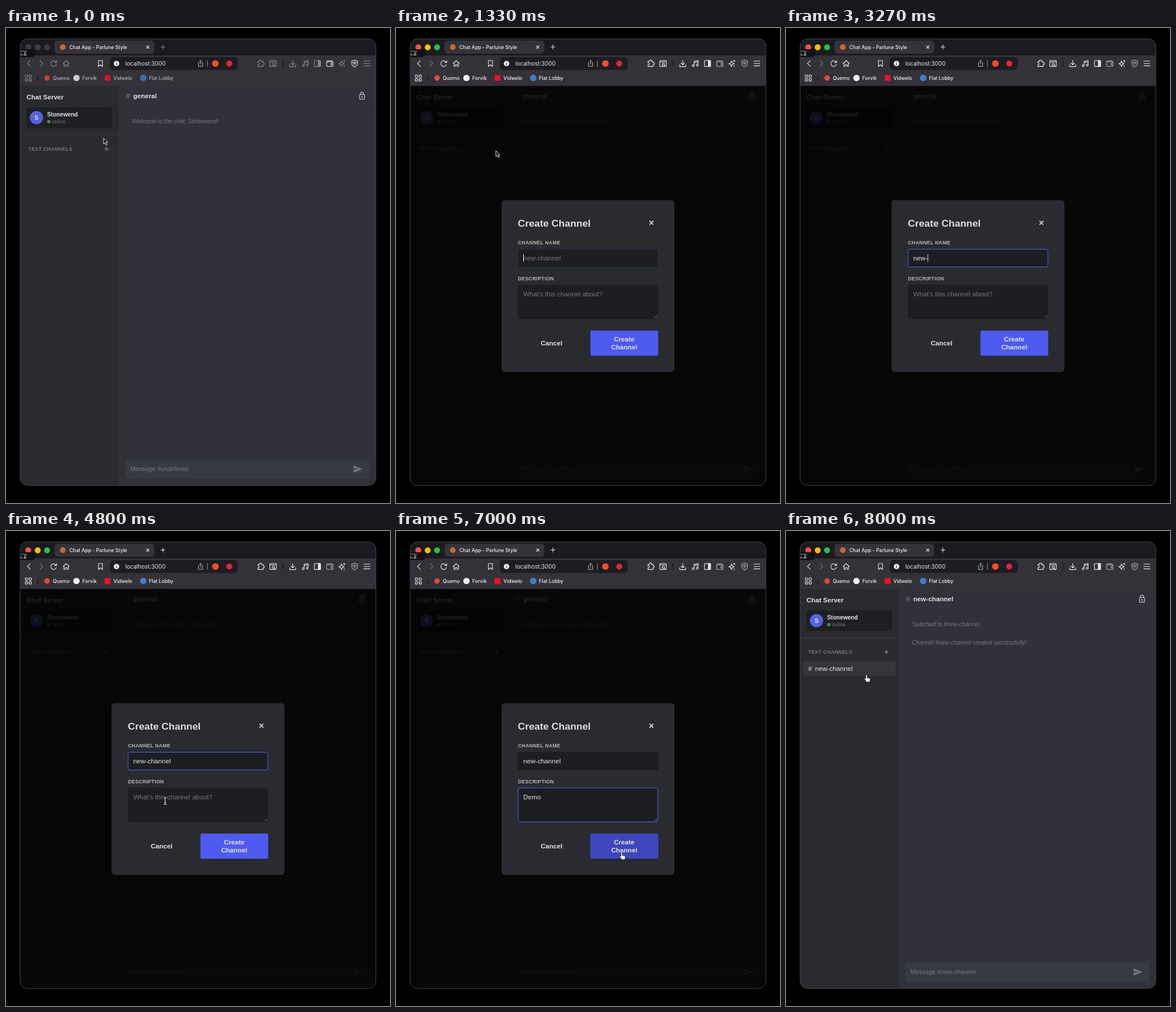
Recreate the animation shown at these times as an HTML page. Size 673 px wide and 832 px high, loop 8070 ms.

```html
<!DOCTYPE html>
<html lang="en">
<head>
<meta charset="utf-8">
<title>Chat App</title>
<style>
  html, body { margin: 0; width: 100%; height: 100%; overflow: hidden; background: #000; }
  svg { display: block; width: 673px; height: 832px; }
  text { font-family: "Liberation Sans", Arial, sans-serif; font-size: 11.6px; fill: #e2e3e6; white-space: pre; }
  .ui text { font: 500 8.6px Inter, sans-serif; fill: #f0f0f2; }
  .ui .url { font-size: 10px; font-weight: 400; fill: #e8e8ea; }
  .b { font-weight: bold; }
  .mid { text-anchor: middle; }
  .note { font-size: 10.15px; font-style: italic; fill: #77787e; }
  .label { font-size: 8.7px; font-weight: bold; letter-spacing: .35px; fill: #b6b7bc; }
  .ghost, .hint { fill: #75767c; }
  .line { fill: none; stroke: #e8e8ea; stroke-width: 1.1; stroke-linecap: round; stroke-linejoin: round; }
  .soft { stroke: #b5b4b9; }
  .faint { stroke: #77767c; }
  .idle .line { stroke: #89888e; }
  .idle .soft, .idle .mark { stroke: #f0f0f2; }
  .idle .faint { stroke: #89888e; }
  .idle .marks text { fill: #b3b2b7; }
  .idle .marks .logo { opacity: .8; }
  .idle .lights circle { fill: #3c3b41; }
  .field { fill: #1d1e22; }
  .ring { fill: none; stroke: #5560dc; }
</style>
</head>
<body>
<svg id="stage" viewBox="0 0 673 832">
  <defs>
    <clipPath id="frame"><rect x="25" y="19" width="623" height="782" rx="13"/></clipPath>
    <linearGradient id="face" x2="1" y2="1">
      <stop stop-color="#5b68ea"/><stop offset="1" stop-color="#4f5bd2"/>
    </linearGradient>
  </defs>

  <g clip-path="url(#frame)">
    <rect x="25" y="19" width="623" height="782" fill="#313239"/>

    <!-- chat page -->
    <rect x="25" y="101" width="173" height="700" fill="#2a2b2f"/>
    <path d="M198 136.5H648" stroke="#2d2e34"/>
    <path d="M25 187H198" stroke="#3a3b40"/>
    <text class="b" x="36" y="124.7">Chat Server</text>
    <rect x="36" y="139" width="150" height="36" rx="3.5" fill="#1e1f22"/>
    <circle cx="53.5" cy="157" r="11.6" fill="url(#face)"/>
    <text class="b mid" x="53.5" y="160.8" style="font-size:10.5px">S</text>
    <text class="b" x="72" y="154.8" style="font-size:10.15px">Stonewend</text>
    <circle cx="75" cy="164" r="3" fill="#37945a"/>
    <text class="hint" x="81" y="167" style="font-size:8.7px">online</text>
    <text class="label hint" x="39" y="215.1">TEXT CHANNELS</text>
    <path id="plus" d="M172.3 212H179.7M176 208.3V215.7" stroke-width="1.4"/>
    <g id="item">
      <rect x="30" y="228" width="162" height="25.5" rx="3" fill="#35363b"/>
      <text x="39" y="244.6">#</text>
      <text x="51" y="244.6">new-channel</text>
    </g>
    <text class="hint" x="209.5" y="124" style="font-size:14.5px">#</text>
    <text class="b" id="room" x="223" y="123.2"></text>
    <g fill="none" stroke="#bdbec2" stroke-width="1.3">
      <rect x="619.7" y="116.7" width="8.6" height="8" rx="1"/>
      <path d="M621.3 116.5V115a2.7 2.7 0 0 1 5.4 0V116.5"/>
      <circle cx="624" cy="120.7" r=".6"/>
    </g>
    <text class="note" id="note1" x="221" y="166.7"></text>
    <text class="note" id="note2" x="221" y="199.2">Channel #new-channel created successfully!</text>
    <rect x="209.5" y="755.5" width="427.5" height="34.5" rx="6" fill="#383a41"/>
    <text class="hint" id="prompt" x="218" y="776.4" style="font-size:10.85px"></text>
    <path d="M609 766.3L624.5 772.6L609 779V774L619 772.6L609 771.2Z" fill="#77787e"/>

    <!-- dialog -->
    <g id="modal">
      <rect x="25" y="101" width="623" height="700" fill="#000" opacity=".86"/>
      <rect x="185" y="301.5" width="303" height="301" rx="6" fill="#2a2b30"/>
      <text class="b" x="213.6" y="348" style="font-size:17.4px;fill:#dcdde0">Create Channel</text>
      <path d="M444.3 337.8L451 344.6M451 337.8L444.3 344.6" stroke="#c2c3c7" stroke-width="2"/>
      <text class="label" x="213.7" y="379">CHANNEL NAME</text>
      <rect class="field" x="213.5" y="387" width="246" height="32" rx="3"/>
      <rect class="ring" id="ring1" x="214" y="387.5" width="245" height="31" rx="3"/>
      <text class="ghost" id="ghost1" x="223" y="407">new-channel</text>
      <text id="text1" x="223" y="407"></text>
      <text class="label" x="213.7" y="441.7">DESCRIPTION</text>
      <rect class="field" x="213.5" y="449.5" width="246" height="60.5" rx="3"/>
      <rect class="ring" id="ring2" x="214" y="450" width="245" height="59.5" rx="3"/>
      <text class="ghost" id="ghost2" x="223" y="470">What's this channel about?</text>
      <text id="text2" x="223" y="470"></text>
      <path d="M453 508L458 503M456 508L458 506" stroke="#8a8b90" stroke-width=".8"/>
      <rect id="caret" width="1" height="13" fill="#eee"/>
      <text class="b mid" x="272.7" y="555.7">Cancel</text>
      <rect x="340.8" y="530" width="118.7" height="44" rx="2.5" fill="#4f5af0"/>
      <rect id="hover" x="340.8" y="530" width="118.7" height="44" rx="2.5" fill="#3d46bc"/>
      <text class="b mid" x="400" y="549.2">Create</text>
      <text class="b mid" x="400" y="562.7">Channel</text>
    </g>

    <!-- browser -->
    <g class="ui" id="ui">
      <rect x="25" y="19" width="623" height="29" fill="#1b1a21"/>
      <rect x="25" y="48" width="623" height="53.5" fill="#343139"/>
      <g class="lights">
        <circle cx="39" cy="33.7" r="5.2" fill="#fb5049"/>
        <circle cx="55.6" cy="33.7" r="5.2" fill="#fdbc09"/>
        <circle cx="72" cy="33.7" r="5.2" fill="#2bbd46"/>
      </g>
      <rect x="85" y="22" width="175" height="23" rx="6" fill="#35323a"/>
      <circle cx="99.5" cy="33.5" r="5" fill="#c9682b"/>
      <text x="111" y="36.6">Chat App - Parlune Style</text>
      <path d="M246 31L251 36M251 31L246 36" stroke="#e0e0e2" stroke-width="1.1"/>
      <path class="line" d="M271.3 33.3H278.7M275 29.6V37"/>

      <path class="line" d="M42.7 57.2L37.6 62.2L42.7 67.2"/>
      <path class="line faint" d="M59.5 57.2L64.5 62.2L59.5 67.2"/>
      <path class="line" d="M88 60A5 5 0 1 0 88.3 64M88.7 57V60.4H85.3"/>
      <path class="line" d="M100.3 62L105.5 57L110.7 62M101.6 61V67.3H104V64H107V67.3H109.4V61"/>
      <path class="line mark" d="M162 57H169V67.5L165.5 64.5L162 67.5Z"/>
      <rect x="182" y="51" width="224" height="22.5" rx="6" fill="#1e1c22"/>
      <circle cx="193.7" cy="62.2" r="4.8" fill="#e8e8ea"/>
      <path d="M193.7 61.6V65M193.7 59.3V60.3" stroke="#1e1c22" stroke-width="1.1"/>
      <text class="url" x="209" y="65.8">localhost:3000</text>
      <path d="M338.8 60.6H337.3V67.2H344.7V60.6H343.2M341 64V56.6M338.9 58.6L341 56.5L343.1 58.6" fill="none" stroke="#bcbbc0"/>
      <path d="M353 56.5V68" stroke="#97969c"/>
      <circle cx="367" cy="62.2" r="5.8" fill="#ee5029"/>
      <circle cx="391.3" cy="62.2" r="5.3" fill="#d8293f"/>

      <path class="line" d="M441.6 58.6H444.3Q443.6 56 446 56Q448.4 56 447.7 58.6H450.6V61Q452.9 60.4 452.9 62.6Q452.9 64.8 450.6 64.2V67.4H441.6V64.4Q444 64.6 444 62.7Q444 60.8 441.6 61Z"/>
      <g class="line">
        <rect x="462.3" y="57" width="11.4" height="10.4" rx="1"/>
        <path d="M462.5 59.3H473.5M470 65L471.5 66.3"/>
        <circle cx="468.4" cy="63.2" r="2"/>
      </g>
      <path d="M485.5 57V68" stroke="#17161b" stroke-width="1.3"/>
      <path class="line" d="M502.5 56.7V64.3M499.5 61.5L502.5 64.5L505.5 61.5M497.2 64.3V67.6H507.8V64.3"/>
      <g class="line">
        <path d="M522.5 66V58.3L529.5 56.8V64.8M522.5 60.6L529.5 59.1"/>
        <circle cx="520.8" cy="66" r="1.7"/><circle cx="527.8" cy="64.9" r="1.7"/>
      </g>
      <g class="line">
        <rect x="540.5" y="57" width="11" height="10.4" rx="1"/>
        <path d="M548 57.5V67M549.6 57.5V67" stroke-width="2.4"/>
      </g>
      <path class="line soft" d="M571.5 59.3V57.5H563.5Q562 57.5 562 59.3V66Q562 67.3 563.5 67.3H573V59.3H563.5M573 61.8H569.5V64.8H573"/>
      <path class="line" d="M588 57.5Q588.6 61.8 592.8 62.6Q588.6 63.4 588 67.8Q587.4 63.4 583.4 62.6Q587.4 61.8 588 57.5ZM592.8 56.3V59.3M591.3 57.8H594.3M592.8 65.8V68"/>
      <path class="line soft" d="M611 56.3L616 58V62.3Q615.6 66.3 611 68.3Q606.4 66.3 606 62.3V58ZM608 61Q611 58.7 614 61M609.4 63Q611 61.8 612.6 63M611 65V65.2"/>
      <path class="line" d="M627.2 58H637.8M627.2 62.2H637.8M627.2 66.4H637.8"/>

      <g class="line">
        <rect x="33.8" y="82.3" width="4" height="4" rx=".7"/><rect x="40.4" y="82.3" width="4" height="4" rx=".7"/>
        <rect x="33.8" y="88.9" width="4" height="4" rx=".7"/><rect x="40.4" y="88.9" width="4" height="4" rx=".7"/>
      </g>
      <path d="M55.8 82.5V93" stroke="#17161b" stroke-width="1.3"/>
      <g class="marks">
        <circle class="logo" cx="72" cy="87.5" r="4.8" fill="#e2483d"/>
        <text x="82" y="90.5">Quemo</text>
        <circle class="logo" cx="123.5" cy="87.5" r="5.6" fill="#f0f0f2"/>
        <text x="133.7" y="90.5">Forvik</text>
        <rect class="logo" x="173" y="82.5" width="10" height="10" fill="#f50f2c"/>
        <text x="188.3" y="90.5">Vidwelo</text>
        <circle class="logo" cx="240.5" cy="87.5" r="5.7" fill="#3f7fca"/>
        <text x="250.5" y="90.5">Flat Lobby</text>
      </g>

      <path d="M24 37.3H45a6.8 6.8 0 0 1 0 13.6H24Z" fill="#111015"/>
      <path d="M24 40.5H35.5V43M24 47.5H29.5M25 45.5H29" fill="none" stroke="#8e8d92"/>
      <circle cx="33.3" cy="43.6" r="1.4" fill="#a5a4a9"/>
      <path d="M30.5 48Q30.7 45.6 33.3 45.6Q35.9 45.6 36.1 48Z" fill="#a5a4a9"/>
    </g>
  </g>
  <rect x="24.8" y="19" width="623.4" height="782.3" rx="13" fill="none" stroke="#47464b"/>

  <g id="cursor">
    <path id="arrow" d="M0 0V10.2L2.4 8L4.1 11.8L6 11L4.3 7.3H7.3Z" fill="#111" stroke="#fff" stroke-width=".9" stroke-linejoin="round"/>
    <path id="hand" d="M-1.3 1.2a1.25 1.25 0 0 1 2.5 0V5L5 5.8Q6.7 6.3 6.5 8L6 10.8Q5.7 12 5 12.6H.2Q-.7 11.4-1.6 9.9L-3.9 7Q-3.9 5.6-2.6 6.1L-1.3 7.3Z" fill="#fff" stroke="#000" stroke-width=".7"/>
    <g id="beam" fill="none">
      <path d="M-2.6-6.2Q0-6.2 0-4.6V4.6Q0 6.2-2.6 6.2M2.6-6.2Q0-6.2 0-4.6M0 4.6Q0 6.2 2.6 6.2M-1.5 2.5H1.5" stroke="#111" stroke-width="2.4"/>
      <path d="M-2.6-6.2Q0-6.2 0-4.6V4.6Q0 6.2-2.6 6.2M2.6-6.2Q0-6.2 0-4.6M0 4.6Q0 6.2 2.6 6.2M-1.5 2.5H1.5" stroke="#eee" stroke-width="1.1"/>
    </g>
  </g>
</svg>
<script>
const LOOP = 8070, TICK = 200 / 3;
const ACTIVE = 600, OPEN = 1330, SWAP = 4930, DONE = 7070;

const nameKeys = [2800, 2870, 3000, 3270, 3470, 3530, 3670, 3800, 3930, 4000, 4130];
const aboutKeys = [5800, 5870, 6000, 6070];

// time, x, y of the pointer's hot spot
const path = [
  [0, 171, 193], [470, 174, 206], [870, 176, 214], [1130, 176, 214],
  [1270, 175.5, 216], [1340, 175, 215], [1930, 300, 398], [4400, 300, 398],
  [4800, 279, 473], [5200, 284, 480], [6400, 284, 480], [6930, 395.5, 563],
  [7335, 395.5, 563], [7530, 235, 328], [7805, 235, 328], [8000, 141, 252]
];

const $ = id => document.getElementById(id);
const clamp = v => Math.max(0, Math.min(1, v));
const show = (id, on) => { $(id).style.display = on ? "" : "none"; };
const inside = (x, y, l, t, r, b) => x > l && x < r && y > t && y < b;
const write = (id, s) => { if ($(id).textContent !== s) $(id).textContent = s; };

function pointAt(t) {
  const i = path.findIndex(p => p[0] > t);
  if (i < 0) return path[path.length - 1].slice(1);
  const [t0, x0, y0] = path[i - 1], [t1, x1, y1] = path[i];
  const u = (t - t0) / (t1 - t0), e = u * u * (3 - 2 * u);
  return [x0 + (x1 - x0) * e, y0 + (y1 - y0) * e];
}

function shapeAt(t, x, y) {
  if (t >= OPEN && t < DONE) {
    if (inside(x, y, 214, 387, 459, 419) || inside(x, y, 214, 450, 459, 510)) return "beam";
    return inside(x, y, 341, 530, 459, 574) ? "hand" : "arrow";
  }
  if (t < OPEN) return t >= ACTIVE && inside(x, y, 169, 205, 183, 219) ? "hand" : "arrow";
  return t < 7400 || inside(x, y, 30, 228, 192, 253.5) ? "hand" : "arrow";
}

function typed(id, word, keys, t) {
  const n = keys.filter(k => k <= t).length;
  write("text" + id, word.slice(0, n));
  show("ghost" + id, !n);
  return n ? keys[n - 1] : 0;
}

function render(t) {
  const open = t >= OPEN && t < DONE, done = t >= DONE;
  const [x, y] = pointAt(t), shape = shapeAt(t, x, y);

  $("ui").classList.toggle("idle", t < ACTIVE);
  write("room", done ? "new-channel" : "general");
  write("prompt", "Message #" + (done ? "new-channel" : "undefined"));
  write("note1", done ? "Switched to #new-channel" : "Welcome to the chat, Stonewend!");
  show("note2", done);
  show("item", done);
  show("modal", open);
  $("plus").setAttribute("stroke", t < OPEN && shape === "hand" ? "#ececee" : "#808187");

  if (open) {
    const first = t < SWAP;
    const last1 = typed(1, "new-channel", nameKeys, t) || OPEN;
    const last2 = typed(2, "Demo", aboutKeys, t) || SWAP;
    const swap = clamp((t - SWAP) / 200);
    $("ring1").style.opacity = clamp((t - 1300) / 200) * (1 - swap);
    $("ring2").style.opacity = swap;
    $("hover").style.opacity = clamp((t - 6750) / 200);
    const width = $(first ? "text1" : "text2").getComputedTextLength();
    $("caret").setAttribute("x", 223 + width);
    $("caret").setAttribute("y", first ? 396.3 : 459.3);
    show("caret", Math.floor((t - (first ? last1 : last2)) / 500) % 2 === 0);
  }

  const hidden = (t >= 2800 && t < 4470) || (t >= 5800 && t < 6470);
  show("cursor", !hidden);
  $("cursor").setAttribute("transform", `translate(${x} ${y})`);
  for (const id of ["arrow", "hand", "beam"]) show(id, id === shape);
}

const start = performance.now();
function loop() {
  const t = (performance.now() - start) % LOOP;
  render(Math.floor((t + 5) / TICK) * TICK + 5);
  requestAnimationFrame(loop);
}
loop();
</script>
</body>
</html>
```
